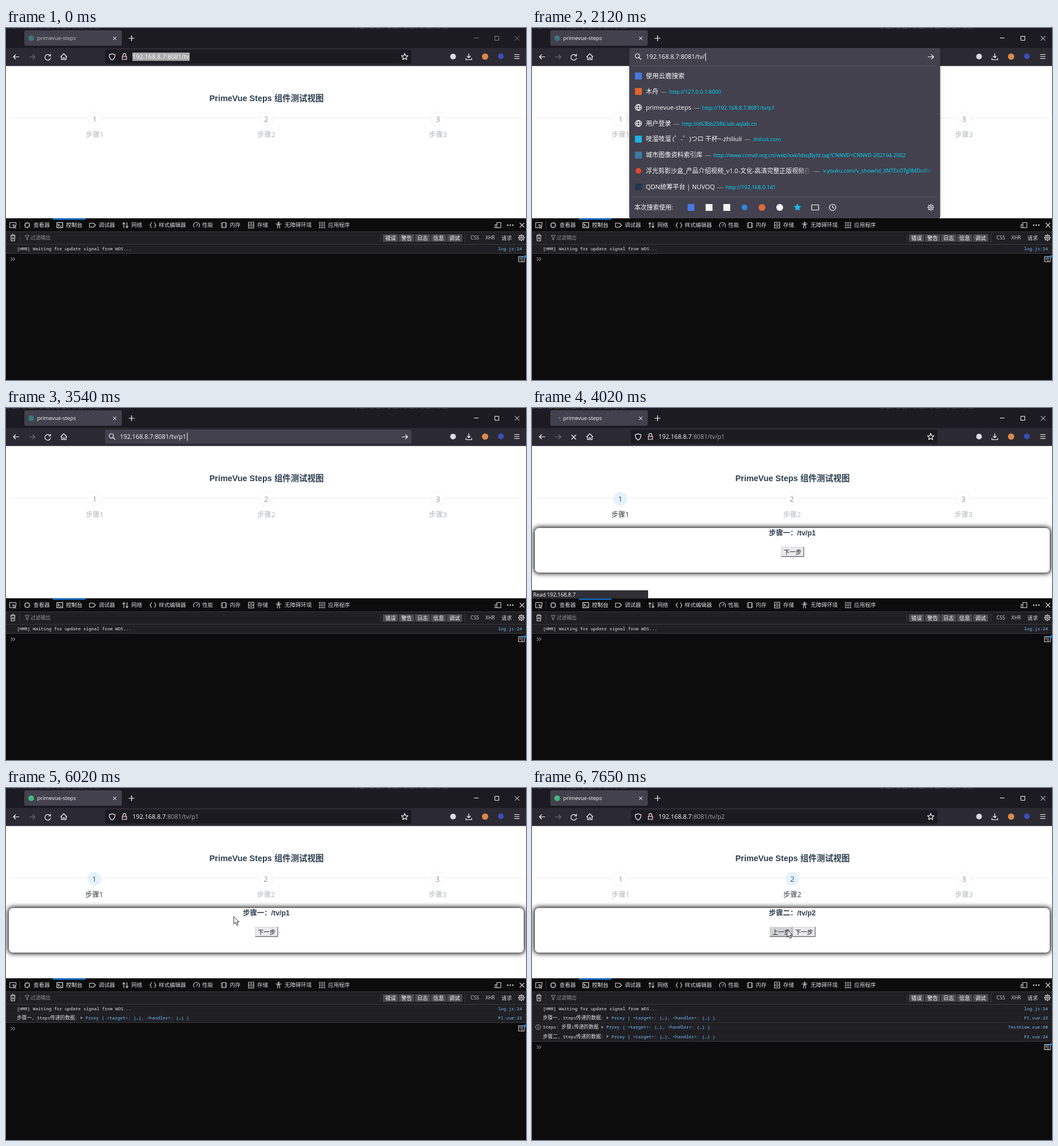
Animation, 909 px wide and 616 px high, one loop 8000 ms. Source, as an HTML page:

```html
<!DOCTYPE html>
<html lang="zh">
<head>
<meta charset="utf-8">
<title>Steps</title>
<style>
html, body { margin: 0; width: 100%; height: 100%; overflow: hidden; background: #0c0c0d }
svg { display: block; width: 909px; height: 616px }
text { font-family: "Open Sans", "Noto Sans CJK SC", "Noto Sans CJK", sans-serif; white-space: pre }
.mono { font-family: "Noto Sans Mono", "Noto Sans CJK SC", "Noto Sans CJK", monospace }
.page { font-family: "Liberation Sans", "Noto Sans CJK SC", "Noto Sans CJK", sans-serif }
#tab, #bar { font-weight: 500 }
.glow { filter: blur(4px) }
.drop { filter: drop-shadow(0 2px 5px rgba(0, 0, 0, .15)) }
</style>
</head>
<body>
<svg viewBox="0 0 909 616">
  <defs>
    <linearGradient id="fade"><stop stop-color="#42414d" stop-opacity="0"/><stop offset="1" stop-color="#42414d"/></linearGradient>
    <clipPath id="clip"><rect y="35" width="703" height="300"/></clipPath>
  </defs>
  <g id="view"></g><g id="tools"></g><g id="log"></g><g id="chrome"></g>
  <g id="tab"></g><g id="bar"></g><g id="mouse"></g>
</svg>
<script>
const WHITE = '#fbfbfe', GREY = '#a3a3a9', FIELD = '#42414d', DARK = '#1c1b22', CYAN = '#00ddff', BLUE = '#75bfff';
const ROW = '#202024', LINE = '#38383d', INK = '#d7d7db';

// Shape helpers; text is centred vertically on y.
const text = (x, y, s, size, fill = WHITE, attr = '') =>
  `<text x="${x}" y="${(y + size * .36).toFixed(2)}" font-size="${size}" fill="${fill}" ${attr}>${s}</text>`;
const rect = (x, y, w, h, fill, attr = '') =>
  `<rect x="${x}" y="${y}" width="${w}" height="${h}" fill="${fill}" ${attr}/>`;
const dot = (x, y, r, fill, attr = '') => `<circle cx="${x}" cy="${y}" r="${r}" fill="${fill}" ${attr}/>`;
const icon = (x, y, d, c = WHITE, w = 1.2, fill = 'none') =>
  `<path transform="translate(${x} ${y})" d="${d}" fill="${fill}" stroke="${c}" stroke-width="${w}" stroke-linejoin="round"/>`;
const square = (x, y, fill) => rect(x - 6, y - 6, 12, 12, fill);
const span = (s, attr) => `<tspan ${attr}>${s}</tspan>`;
const ring = r => `M${-r} 0a${r} ${r} 0 1 1 ${2 * r} 0a${r} ${r} 0 1 1 ${-2 * r} 0`;
const polar = (n, f) => Array.from({ length: n }, (_, i) => f(i, Math.sin(i * 2 * Math.PI / n), -Math.cos(i * 2 * Math.PI / n)));

const STAR = 'M' + polar(10, (i, s, c) => { const r = i % 2 ? 2.7 : 6; return `${s * r} ${c * r}`; }).join('L') + 'Z';
const GEAR = ring(4) + ring(1.6) + polar(8, (i, s, c) => `M${s * 4} ${c * 4}L${s * 6} ${c * 6}`).join('');
const GLOBE = ring(5.4) + 'M-5.4 0H5.4M0-5.4C-3.4-2-3.4 2 0 5.4 3.4 2 3.4-2 0-5.4';
const CROSS = 'M-4-4 4 4M4-4-4 4';
const SMALL_CROSS = 'M-3-3 3 3M3-3-3 3';
const BACK = 'M5 0H-5M-1-4-5 0-1 4';
const NEXT = 'M-5 0H5M1-4 5 0 1 4';
const RELOAD = 'M3.8-3A5 5 0 1 0 5 1M4.8-5.5V-2H1.2';
const LENS = 'M5.5 5.5 1.6 1.6M2.6-1.2A3.8 3.8 0 1 1-5-1.2 3.8 3.8 0 1 1 2.6-1.2';
const SHIELD = 'M0-5.6C2-4.2 4-4 5-4 5 1 4 4 0 5.6-4 4-5 1-5-4-4-4-2-4.2 0-5.6Z';
const LOCK = 'M-3.7-.5H3.7V5H-3.7ZM-2.4-.5V-3A2.4 2.4 0 0 1 2.4-3V-.5';

// ---- Web page ----
function button(x, label, over, down) {
  const fill = down ? '#b1b1b9' : over ? '#d0d0d7' : '#e9e9ed';
  return rect(x, 243, 40, 17.5, fill) +
    icon(x, 243, 'M.5 17V.5H40', '#d6d6da', 1) + icon(x, 243, 'M0 17H39.5V0', '#77777d', 1.4) +
    text(x + 20, 252, label, 10.4, '#111', 'text-anchor="middle"');
}

function page(p, over, down) {
  let out = rect(0, 66, 909, 268, '#fff');
  if (p < 0) return out;
  out += text(455.5, 123, 'PrimeVue Steps 组件测试视图', 14.45, '#2c3e50', 'class="page" font-weight="700" text-anchor="middle"') +
    rect(5, 157.5, 900, 1, '#e9ebed');
  for (let i = 1; i < 4; i++) {
    const on = i == p, x = 300 * i - (p == 1 ? 145.7 : 145);
    out += dot(x, 159, 12, on ? '#e3f2fd' : '#fff', on ? '' : 'stroke="#f0f1f3"') +
      text(x, 159.3, i, 13.2, on ? '#495057' : '#929699', 'text-anchor="middle"') +
      text(x, 186.5, '步骤' + i, 12.2, on ? '#343a40' : '#b2b5b8', `text-anchor="middle" font-weight="${on ? 500 : 400}"`);
  }
  if (!p) return out;
  return out + rect(3.4, 208.4, 903.2, 81.2, '#000', 'rx="8" class="glow"') + rect(5, 210, 900, 78, '#fff', 'rx="7"') +
    text(455, 219, `步骤${' 一二'[p]}：/tv/p${p}`, 12.4, '#2c3e50', 'class="page" font-weight="700" text-anchor="middle"') +
    (p == 1 ? button(435.5, '下一步', over, down) : button(415.5, '上一步', over) + button(455.5, '下一步'));
}

// ---- Developer tools ----
function devtools() {
  let out = rect(0, 333, 909, 283, '#0c0c0d') + rect(0, 356, 909, 22, ROW) +
    rect(0, 356, 909, 1, LINE) + rect(82, 333.5, 57, 2, '#0a84ff');
  const tabs = [
    [37, 48, '查看器', 'M-3.5-3.5H3.5V3.5H-3.5ZM0-5.5V-3.5M0 3.5V5.5M-5.5 0H-3.5M3.5 0H5.5'],
    [94, 105, '控制台', 'M-5-4.5H5V4.5H-5ZM-3-2-1 0-3 2M0 2H3'],
    [151, 162, '调试器', 'M-5-3.5H2L5.5 0 2 3.5H-5Z'],
    [208.5, 219, '网络', 'M-2.5 5V-4M-5-1.5-2.5-4.5 0-1.5M3-5V4M.5 1.5 3 4.5 5.5 1.5'],
    [257, 267, '样式编辑器', 'M-2-4.5C-5-4.5-2.5 0-5.5 0-2.5 0-5 4.5-2 4.5M2-4.5C5-4.5 2.5 0 5.5 0 2.5 0 5 4.5 2 4.5'],
    [333, 343, '性能', 'M-4 4A5.3 5.3 0 1 1 4 4M0 2 2-2'],
    [381, 391, '内存', 'M-3-4.5H3V4.5H-3ZM-5.5-3H-3M-5.5 0H-3M-5.5 3H-3M3-3H5.5M3 0H5.5M3 3H5.5'],
    [428.5, 439, '存储', 'M-4.5-5H4.5V5H-4.5ZM-4.5 0H4.5M-1.5-2.5H1.5M-1.5 2.5H1.5'],
    [476.5, 487, '无障碍环境', 'M-5-2H5M0-2V1M-2 5.5-1.5-2H1.5L2 5.5M-1-4.5A1 1 0 1 1 1-4.5 1 1 0 1 1-1-4.5'],
    [552.5, 563, '应用程序', [-5, -1, 3].map(a => [-5, -1, 3].map(b => `M${a} ${b}h2v2h-2z`).join('')).join('')]];
  tabs.forEach(([ix, x, s, d], i) => {
    const c = i == 1 ? '#fff' : INK;
    out += icon(ix, 345, d, c, i == 9 ? .7 : 1.1) + text(x, 344.5, s, 9.5, c);
  });
  out += icon(12, 345, 'M0 4.5H-5.5V-4.5H5.5V0M0-1 5.5 1.5 3 3 1.5 5.5ZM3 3 5.5 5.5', INK, 1.1) +
    icon(860, 345, 'M-2-4.5H5V4.5H-2ZM-5-1H-2M-5-1V4.5H-2', INK, 1.1) +
    [877, 881.5, 886].map(x => dot(x, 345, 1.3, INK)).join('') + icon(902, 345, CROSS, INK) +
    [[24, 338, 14], [24, 360, 15], [655, 360, 15], [802, 360, 15]].map(([x, y, h]) => rect(x, y, 1, h, LINE)).join('') +
    icon(12, 367, 'M-4.5-3.5H4.5M-2-3.5V-5.5H2V-3.5M-3.5-3.5-3 5.5H3L3.5-3.5M-1-1V3M1-1V3', INK, 1.1) +
    icon(37, 367, 'M-3.5-4H3.5L1 0V4L-1 3V0Z', '#939395', 1) + text(43, 367, '过滤输出', 8.7, '#939395');
  ['错误', '警告', '日志', '信息', '调试'].forEach((s, i) => {
    const x = 659 + 28 * i;
    out += rect(x, 361, 26.5, 13, '#4a4a4f', 'rx="1"') + text(x + 13.3, 367.2, s, 9.2, '#fff', 'text-anchor="middle"');
  });
  return out + text(812, 367.2, 'CSS', 8.6, INK) + text(838, 367.2, 'XHR', 8.6, INK) +
    text(866, 367.2, '请求', 9.2, INK) + icon(901, 367, GEAR, INK, 1.3);
}

const PROXY = 'Proxy { &lt;target&gt;: {…}, &lt;handler&gt;: {…} }';
const LOGS = [
  ['[HMR] Waiting for update signal from WDS...', 'log.js:24'],
  ['步骤一, Steps传递的数据:', 'P1.vue:23', 139],
  ['Steps: 步骤1传递的数据', 'TestView.vue:60', 130],
  ['步骤二, Steps传递的数据:', 'P2.vue:24', 139]];

function consoleRows(n) {
  const mono = (x, y, s, c, attr = '') =>
    text(x, y, s.replace(/[\u3400-\u9fff]+/g, m => span(m, 'font-size="8.6"')), 7.75, c, 'class="mono" ' + attr);
  let out = '';
  LOGS.slice(0, n).forEach(([s, link, x], i) => {
    const y = 385.9 + 16.3 * i;
    out += rect(0, y - 8, 909, 16.3, ROW) + rect(0, Math.round(y + 8), 909, 1, LINE) +
      mono(19, y, s, '#e4e4e8') + mono(902, y, link, BLUE, 'text-anchor="end"');
    if (x) out += icon(x - 8.5, y, 'M0-2.5 3.5 0 0 2.5Z', 'none', 0, '#939395') + mono(x, y, PROXY, BLUE);
    if (i == 2) out += icon(10.5, y, ring(4.2) + 'M0-1V2.5M0-2.7V-1.8', '#b1b1b3', 1);
  });
  const y = 388.2 + 16.3 * n;
  return out + rect(0, 378, 909, 1, LINE) +
    icon(12, y, 'M-3.5-3-.5 0-3.5 3M.5-3 3.5 0 .5 3', '#939395', 1.1) +
    icon(901, y, 'M-5-4.5H5V4.5H-5ZM1-4.5V4.5M-3-2H-1M-3 0H-1', INK, 1.1) + dot(907, y - 4.5, 2.2, '#0a84ff');
}

// ---- Browser window ----
function toolbar() {
  const strip = x => `<path d="M${x} .5h165" stroke="#55604f" stroke-dasharray="5 4 9 3 2 6" opacity=".6"/>`;
  return rect(0, 0, 909, 35, DARK) + strip(1) + strip(609) + rect(32, 4, 170.5, 27, FIELD, 'rx="3"') +
    rect(0, 35, 909, 31.5, '#2b2a33') + icon(190, 18, SMALL_CROSS, WHITE, 1) + icon(219.5, 18, 'M-5 0H5M0-5V5') +
    icon(18, 50.5, BACK) + icon(45.5, 50.5, NEXT, '#72717a') +
    icon(101, 50.5, 'M-5.5 0 0-5.5 5.5 0M-4-1V5H-1.2V1.5H1.2V5H4V-1') +
    dot(781.5, 50, 5, '#dcdce0') + icon(809, 50, 'M0-5.5V2M-3-1 0 2 3-1M-5 2.5V5.5H5V2.5') +
    dot(837.5, 50, 5.5, '#d98a4a') + dot(865, 49.5, 5, '#3a4fb8') + icon(893, 50, 'M-4.5-3.5H4.5M-4.5 0H4.5M-4.5 3.5H4.5');
}

function tabStrip(t) {
  const c = t < 920 ? '#c4c4c9' : WHITE, busy = t >= 3610 && t < 4360;
  const w = t < 920 ? '#85848b' : WHITE;
  return text(54.5, 18, 'primevue-steps', 9.4, c) +
    (busy ? dot(44 + 4 * Math.cos((t - 4020) / 143), 17.5, 1.5, '#2f86e8')
      : dot(44, 18, 5, t < 3610 ? '#38777d' : '#41b883')) +
    icon(822, 17.5, 'M-4 0H4', w, 1) + icon(858, 18, 'M-3.5-3.5H3.5V3.5H-3.5Z', w, 1) + icon(893.5, 18, CROSS, w, 1) +
    icon(73, 51, t >= 3610 && t < 4690 ? CROSS : RELOAD) +
    (t >= 3680 && t < 4290 ? rect(0, 319, 203, 14.5, '#2f2f35') + text(2, 326.5, 'Read 192.168.8.7', 9.3) : '');
}

const link = s => span(s, `dx="4" font-size="9.3" fill="${CYAN}"`);
const DASH = span('—', `dx="4" fill="${GREY}"`);
const entry = (y, title, url, mark = icon(186, y, GLOBE)) => mark + text(199, y, title + DASH + link(url), 11);

function panel(bottom, rows) {
  const y = bottom - 19;
  return rect(170, 35, 543.5, bottom - 35, FIELD, 'rx="3" class="drop"') +
    rect(175, 66, 533, 1, '#5a5964') + rows + rect(175, bottom - 38, 533, 1, '#5a5964') +
    text(179, y, '本次搜索使用:', 10.8) + square(278, y, '#4a78dc') + square(309.5, y, '#f4f4f4') + square(340.5, y, '#f4f4f4') +
    dot(371.5, y, 5, '#2f8ae0') + dot(402, y, 6, '#de6b3c') + dot(433, y, 6, '#f4f4f4') +
    icon(464, y, STAR, '#19bdf5', 1, '#19bdf5') + icon(495, y, 'M-6-4.5H6V4.5H-6Z') +
    icon(525.5, y, ring(5.5) + 'M0-3.5V0L2.5 1.5') + icon(697, y, GEAR, WHITE, 1.1);
}

function topSites() {
  return panel(333, square(186, 84, '#4a78dc') + text(199, 83.5, '使用云鹿搜索', 11.3) +
    entry(111, '木舟', 'http://127.0.0.1:8000', square(186, 111, '#e2642f')) +
    entry(139, 'primevue-steps', 'http://192.168.8.7:8081/tv/p1') +
    entry(167, '用户登录', 'http://d63bb2586.lab.aqlab.cn') +
    entry(194.5, '吱溜吱溜 (゜-゜)つロ 干杯~-zhiliuli', 'zhiliuli.com', square(186, 194.5, '#1fb0e4')) +
    entry(222.5, '城市图像资料索引库', 'http://www.cnnvd.org.cn/web/xxk/ldxqById.tag?CNNVD=CNNVD-202104-2002', square(186, 222.5, '#3b7aa8')) +
    dot(186, 250, 5, '#e5482f') + text(199, 250, '浮光剪影沙盒_产品介绍视频_v1.0-文化-高清完整正版视频在', 10.9) +
    rect(488, 242, 16, 16, FIELD) + rect(466, 242, 22, 16, 'url(#fade)') + text(492, 250, '—', 11, GREY) +
    `<g clip-path="url(#clip)">${text(509, 250, 'v.youku.com/v_show/id_XNTExOTg0MDc4MA', 9.3, CYAN)}</g>` + rect(680, 242, 23, 16, 'url(#fade)') +
    entry(278, 'QDN统筹平台 | NUVOQ', 'http://192.168.0.141', square(186, 278, '#22384e')));
}

function matches(path) {
  const bold = s => span(s, 'font-weight="700"'), host = '192.168.8.7:8081', full = '/tv/p1' == path;
  let rows = rect(175, 71, 533, 25, '#2b2a33', 'rx="3"') + icon(186, 84, GLOBE) +
    text(199, 83.5, bold(host + path) + DASH + span('访问', 'dx="4" font-size="9.6"'), 11.2);
  if (!full) {
    rows += text(179, 107.5, 'Firefox建议', 8.8);
    for (let i = 1; i < 4; i++)
      rows += entry(99 + 28 * i, 'primevue-steps', 'http://' + bold(host + path) + `/tv/p${i}`.slice(path.length));
  }
  return panel(full ? 137 : 237, rows);
}

function addressBar(t) {
  const host = '192.168.8.7', typed = t >= 2120 && t < 3610, focus = t >= 920 && t < 3610;
  const path = t < 2950 ? '/tv/' : t < 3210 ? '/tv/p' : '/tv/p1';
  let out = rect(173, 38, 536, 24.5, focus ? FIELD : DARK, 'rx="3"');
  if (t >= 1120 && t < 3540)
    out = t < 2280 ? topSites() : matches(t < 3020 ? '/tv/' : t < 3280 ? '/tv/p' : '/tv/p1');
  if (typed) {
    const caret = path == '/tv/' ? 303 : path == '/tv/p' ? 311 : 316.5;
    out += icon(185.5, 50, LENS) + icon(697, 50.5, NEXT) + text(199, 50, host + ':8081' + path, 10.85);
    return out + (t >= 2680 && t < 2950 ? '' : rect(caret, 43.5, 1, 14, WHITE));
  }
  out += icon(185.5, 50.5, SHIELD) + icon(207, 50, LOCK, WHITE, 1.1) + icon(207, 50.5, 'M-5-5 5 5', '#e4405f', .9) + icon(697, 50.5, STAR);
  if (t < 920) out += rect(221, 43, 100, 14.5, '#a8a8a8');
  const rest = t < 3610 ? ':8081/tv' : `:8081/tv/p${t < 7380 ? 1 : 2}`;
  return out + text(221, 50, host + span(rest, `fill="${t < 3610 ? WHITE : GREY}"`), 10.85) +
    (t >= 920 && t < 1590 ? rect(320, 43.5, 1, 14, WHITE) : '');
}

// ---- Pointer: time, x, y ----
const TRACK = [[70, 842, 560], [420, 650, 280], [860, 471, 52], [4960, 456, 49], [5100, 405, 130], [5230, 363, 232],
  [5360, 398, 228], [5950, 398, 228], [6020, 398, 225], [6630, 463, 246], [7380, 463, 246], [7650, 446, 248], [8000, 446, 248]];

function pointer(t) {
  if (t < 70 || t >= 2120 && t < 4960) return null;
  const i = TRACK.findIndex(k => k[0] > t), [ta, xa, ya] = TRACK[i - 1], [tb, xb, yb] = TRACK[i];
  if (tb == 4960) return [xa, ya];
  const u = (t - ta) / (tb - ta);
  return [xa + (xb - xa) * u, ya + (yb - ya) * u];
}

function drawPointer(t, at) {
  if (!at) return '';
  return t >= 790 && t < 2120 ? icon(...at, 'M-3-7.5H-1L0-6.5 1-7.5H3M0-6.5V6.5M-3 7.5H-1L0 6.5 1 7.5H3', '#fff', 1)
    : icon(...at, 'M0 0V13L3 10.2 5.2 15.3 7.4 14.4 5.2 9.4H9.3Z', '#111', .9, '#fff');
}

const drawn = {};
function put(id, html) {
  if (drawn[id] !== html) document.getElementById(id).innerHTML = drawn[id] = html;
}

put('tools', devtools());
put('chrome', toolbar());

function frame() {
  const t = performance.now() % 8000, at = pointer(t);
  const over = at && at[1] > 242 && at[1] < 261 && at[0] > (t < 7380 ? 436 : 416) && at[0] < (t < 7380 ? 476 : 456);
  const blank = t >= 3820 && t < 3950;
  put('view', page(blank ? -1 : t < 3820 ? 0 : t < 7380 ? 1 : 2, over, t >= 7310 && t < 7380));
  put('log', consoleRows(blank ? 0 : t < 4290 ? 1 : t < 7380 ? 2 : 4));
  put('tab', tabStrip(t));
  put('bar', addressBar(t));
  put('mouse', drawPointer(t, at));
  requestAnimationFrame(frame);
}
frame();
</script>
</body>
</html>
```
